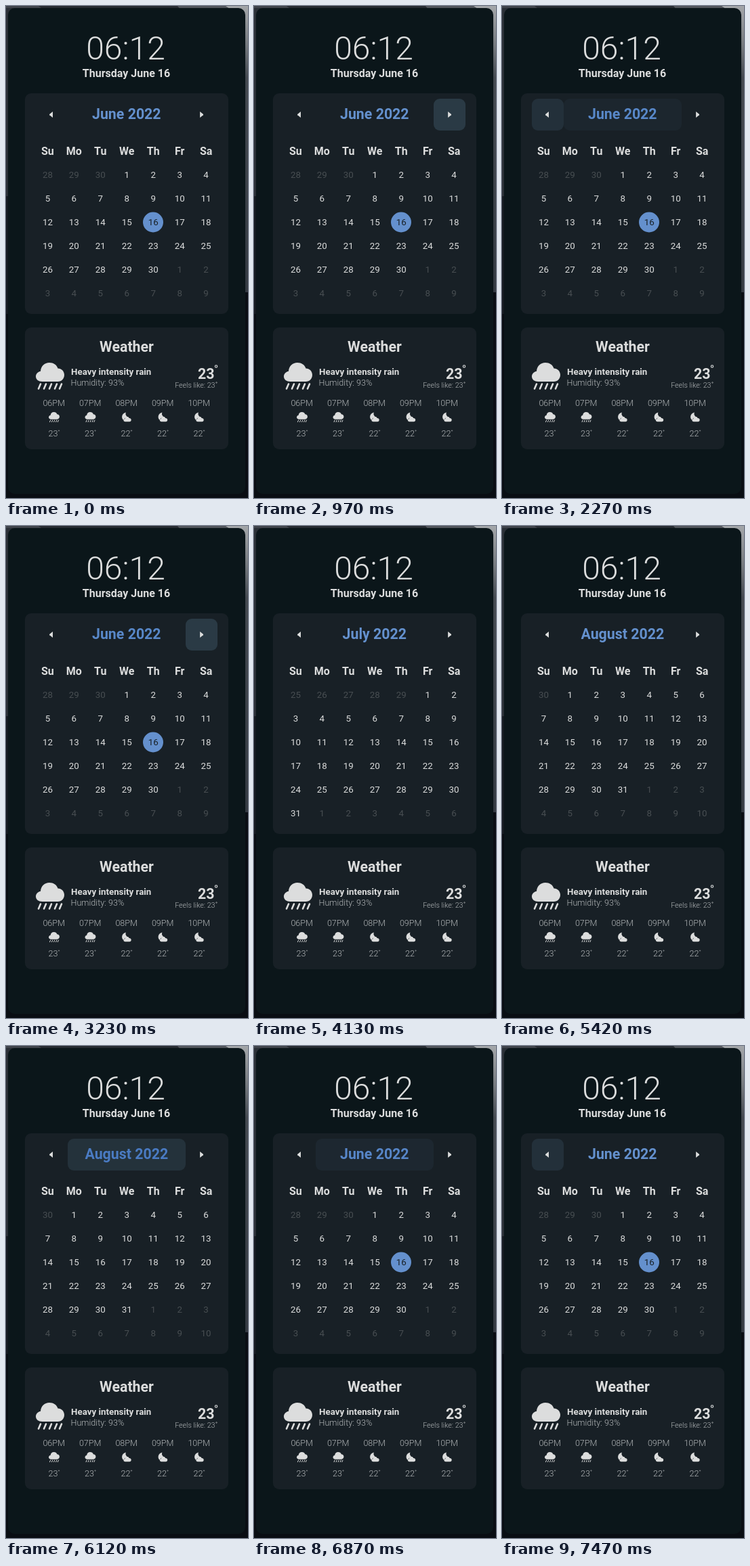
These frames come from a looping animation (357x727 px, 8 s). An HTML page:

```html
<!DOCTYPE html>
<html lang="en">
<head>
<meta charset="utf-8">
<title>Calendar and weather panel</title>
<style>
html, body { margin: 0; width: 100%; height: 100%; overflow: hidden; background: #090d13; }
svg { display: block; width: 357px; height: 727px; font-family: Roboto, sans-serif; fill: #dcdddd; }
text { white-space: pre; }
.m { text-anchor: middle; }
.b { font-weight: 700; }
.l { font-weight: 300; }
.h1 { font-size: 21.33px; }
.h2 { font-size: 16px; }
.day { font-size: 13.33px; }
.small { font-size: 12.6px; }
.soft { fill: #b3b7b9; }
.dim { fill: #484e52; }
.ring { fill: none; stroke: #c8cbcc; }
</style>
</head>
<body>
<svg id="stage" viewBox="0 0 357 727">
  <defs>
    <linearGradient id="rightEdge" x2="0" y2="1">
      <stop offset="0" stop-color="#a3a6a9"/>
      <stop offset=".13" stop-color="#777b80"/>
      <stop offset=".25" stop-color="#444950"/>
      <stop offset="1" stop-color="#343a42"/>
    </linearGradient>
    <g id="rain">
      <path d="M9.5 28C4 28 0 25 0 20.5C0 16.5 3 13.4 7 12.7C7.5 5 13 0 20 0C26 0 30.5 3 32.5 8.4C38 8.4 42 12.8 42 18C42 24 37.8 28 32.5 28Z"/>
      <path d="M7 31.5l-3 7M15 31.5l-3 7M23 31.5l-3 7M31 31.5l-3 7M38 31.5l-3 7" stroke="#dcdddd" stroke-width="2.6" stroke-linecap="round"/>
    </g>
    <g id="night">
      <path d="M5.8 0C2 1 0 3.7 0 6.6C0 8.6 .8 10.2 2 11.3L4.2 8.5L7.4 6C5.4 4.500 4.800 2.200 5.800 0Z"/>
      <path d="M4.800 13.700C1.500 13.700 1.600 9.700 4.300 9.500C4.500 5.500 9.700 5.300 10.500 8.500C14.500 8.200 14.700 13.700 11 13.700Z"/>
    </g>
  </defs>

  <path fill="#272b31" d="M0 0h357v12H0z"/>
  <path fill="#40444b" d="M0 0h48l4 3H0z"/>
  <path fill="#50545a" d="M253 0h80v6h-75z"/>
  <path fill="#a3a6a9" d="M324 0h33v14h-12z"/>
  <path fill="#2b3037" d="M0 3h8v278H0z"/>
  <path fill="#151a21" d="M0 281h8v174H0z"/>
  <path fill="url(#rightEdge)" d="M347 0h10v423h-10z"/>
  <rect x="3" y="3" width="350" height="718" rx="10" fill="#0b161a"/>
  <rect x="28" y="129" width="300" height="326" rx="9" fill="#182026"/>
  <rect x="28" y="475" width="300" height="180" rx="9" fill="#182026"/>

  <text class="m l" x="176.500" y="79" font-size="48">06:12</text>
  <text class="m b h2" x="177.500" y="105">Thursday June 16</text>

  <g fill="#2a3a45">
    <rect id="leftBox" x="44" y="137" width="47" height="47" rx="9"/>
    <rect id="titleBox" x="91" y="137" width="174" height="47" rx="9"/>
    <rect id="rightBox" y="137" height="47" rx="9"/>
  </g>
  <path d="M64.300 159.800L69 156v9L64.300 161.200Q63.600 160.500 64.300 159.800z"/>
  <path id="rightArrow" d="M2.300 -.7L-2.400 -4.500v9L2.300 .7Q3 0 2.300 -.7z"/>
  <text id="title" class="m b h1" y="167"></text>
  <g id="calendar"></g>

  <text class="m b h1" x="178" y="511">Weather</text>
  <use href="#rain" x="44" y="527"/>
  <text class="b" x="96" y="545" font-size="13.33">Heavy intensity rain</text>
  <text class="l small soft" x="95.500" y="561">Humidity: 93%</text>
  <text class="b h1" x="307.500" y="551" text-anchor="end">23</text>
  <circle class="ring" cx="310" cy="532.500" r="1.700" stroke-width="1.200"/>
  <text class="l soft" x="308.500" y="564" text-anchor="end" font-size="10.67">Feels like: 23</text>
  <circle class="ring" cx="310.500" cy="556.500" r=".8" stroke-width=".6"/>
  <g id="hours"></g>
</svg>
<script>
const $ = id => document.getElementById(id);
const LOOP = 8000;

// name, first weekday, days in month, days in the month before
const months = [["June", 3, 30, 31], ["July", 5, 31, 30], ["August", 1, 31, 31]];

const label = (cls, x, y, s) => `<text class="m ${cls}" x="${x}" y="${y}">${s}</text>`;
const column = i => 61.4 + 38.95 * i;
const header = ["Su", "Mo", "Tu", "We", "Th", "Fr", "Sa"]
  .map((d, i) => label("b h2", column(i), 220, d)).join("");

function monthGrid(index) {
  const [, first, days, before] = months[index];
  let out = header;
  for (let i = 0; i < 42; i++) {
    const x = column(i % 7), row = Math.floor(i / 7), y = 254.3 + 35 * row;
    const n = i - first + 1;
    const today = index === 0 && n === 16;
    const inside = n > 0 && n <= days;
    const shown = n < 1 ? before - 1 + n : inside ? n : n - days;
    if (today) out += `<circle cx="217" cy="${y - 4.8}" r="15" fill="#6490cd"/>`;
    const text = label(inside ? "day" : "day dim", x, y, shown);
    out += today ? text.replace("<text", '<text fill="#182026"') : text;
  }
  return out;
}
const grids = months.map((_, i) => monthGrid(i));

$("hours").innerHTML = ["06PM", "07PM", "08PM", "09PM", "10PM"].map((hour, i) => {
  const x = 70.7 + 53.5 * i, wet = i < 2;
  const icon = wet
    ? `<use href="#rain" transform="translate(${x - 7.7} 600) scale(.38)"/>`
    : `<use href="#night" x="${x - 6.6}" y="600.5"/>`;
  return label("l small soft", x, 591, hour) + icon +
    label("l small soft", x - 1.2, 636, wet ? 23 : 22) +
    `<circle class="ring" cx="${x + 7.3}" cy="627.5" r=".7" stroke-width=".5"/>`;
}).join("");

// Each step changes some of the values: hover of the three buttons,
// press of the right one, title darkness and month.
const steps = [
  [0, { left: 0, mid: 0, right: 0, press: 0, dark: 0, month: 0 }],
  [970, { right: 1 }],
  [1500, { right: 0, mid: .25, dark: .35 }],
  [2270, { left: .65 }],
  [2720, { left: 0, mid: 0, dark: .3 }],
  [3150, { right: .5 }],
  [3230, { right: 1, dark: .35 }],
  [3600, { press: .4, dark: 0 }],
  [3700, { press: .8 }],
  [3800, { press: 1 }],
  [4030, { press: 0, month: 1, right: .6 }],
  [4130, { right: 0 }],
  [4630, { right: 1 }],
  [4970, { press: .5 }],
  [5070, { press: 1 }],
  [5270, { press: .5, month: 2 }],
  [5340, { press: 0, right: .6 }],
  [5420, { right: 0 }],
  [6120, { mid: .7, dark: .8 }],
  [6600, { dark: 1 }],
  [6870, { mid: .3, dark: .4, month: 0 }],
  [6930, { mid: 0, dark: 0 }],
  [7470, { left: .65 }]
];

const mix = (a, b, k) => a + (b - a) * k;
let shownMonth = -1;

function draw(now) {
  const t = now % LOOP;
  const s = Object.assign({}, ...steps.filter(([at]) => at <= t).map(step => step[1]));
  $("leftBox").setAttribute("opacity", s.left);
  $("titleBox").setAttribute("opacity", s.mid);
  const box = $("rightBox"), x = 265 + 9 * s.press;
  box.setAttribute("opacity", s.right);
  box.setAttribute("x", x);
  box.setAttribute("width", 312 - x);
  $("rightArrow").setAttribute("transform",
    `translate(${(x + 312) / 2} 160.5) scale(${1 - .4 * s.press})`);
  $("title").setAttribute("x", 177.8 + 4.5 * s.press);
  $("title").setAttribute("fill",
    `rgb(${mix(100, 67, s.dark)},${mix(145, 118, s.dark)},${mix(206, 192, s.dark)})`);
  if (s.month !== shownMonth) {
    shownMonth = s.month;
    $("title").textContent = months[shownMonth][0] + " 2022";
    $("calendar").innerHTML = grids[shownMonth];
  }
  requestAnimationFrame(() => draw(performance.now() - start));
}
const start = performance.now();
draw(0);
</script>
</body>
</html>
```
